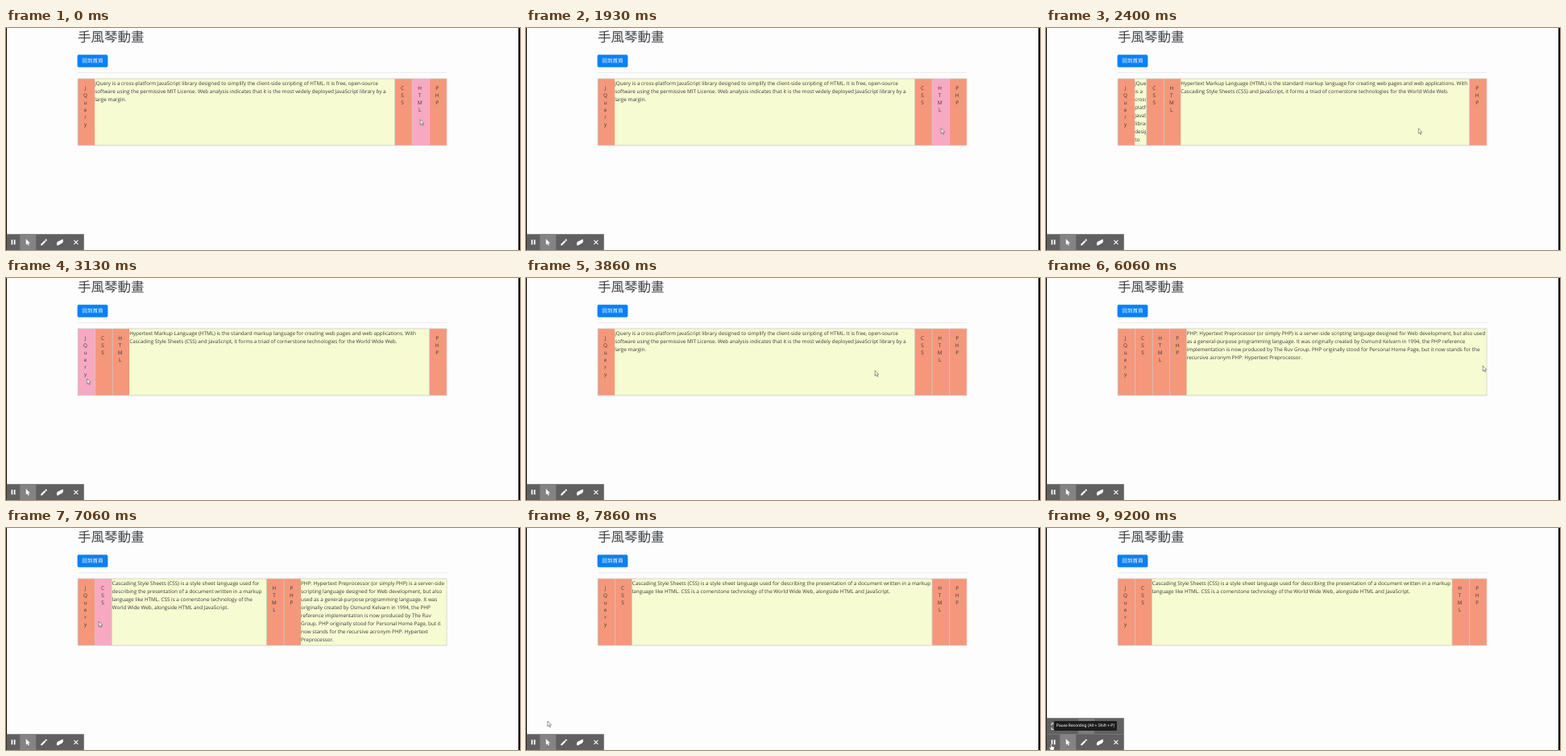
Write an HTML page that moves like this. It is 638 px wide and 276 px high and loops after 9.26 s.

```html
<!DOCTYPE html>
<html lang="zh-Hant">
<head>
<meta charset="utf-8">
<title>手風琴動畫</title>
<style>
  html, body { margin: 0; width: 100%; height: 100%; overflow: hidden; background: #fdfdfd; }
  body {
    position: relative; color: #36393c;
    font: 6.35px/10px "Open Sans", "Noto Sans", sans-serif;
    text-rendering: geometricPrecision;
  }
  body > * { position: absolute; }
  .edge { top: 0; height: 276px; background: #000; }
  h1 {
    left: 89px; top: 0; margin: 0; white-space: nowrap; color: #404346;
    font: 300 16.5px/20px "Noto Sans CJK TC", "Noto Sans CJK", sans-serif;
  }
  .home {
    left: 89px; top: 33px; width: 37px; color: #fff; text-align: center;
    font: 6.6px/15.5px "Noto Sans CJK TC", "Noto Sans CJK", sans-serif;
  }
  #acc { left: 89px; top: 63px; width: 458px; height: 83px; }
  .tab, .text { position: absolute; top: 1px; height: 81.6px; overflow: hidden; }
  .tab { width: 18px; padding-top: 5.8px; line-height: 9px; text-align: center; }
  .tab span { display: block; }
  svg { left: 0; top: 0; }
  #tip {
    left: 10px; top: 240px; width: 78px; height: 12px; border-radius: 1px;
    background: #1d1d1d; color: #fff; text-align: center; white-space: nowrap;
    font: 5px/12px Roboto, sans-serif;
  }
</style>
</head>
<body>
<div class="edge" style="left:0;width:1px"></div>
<div class="edge" style="right:0;width:2px"></div>

<svg width="638" height="276">
  <rect x="88.6" y="33.3" width="37.8" height="15.5" rx="1.7" fill="#0a7ff6"/>
  <rect x="89" y="55.2" width="458.5" height=".7" fill="#e5e5e5"/>
  <g id="panels"></g>
</svg>
<h1>手風琴動畫</h1>
<div class="home">回到首頁</div>
<div id="acc"></div>

<svg width="638" height="276">
  <g id="more">
    <path fill="#616161" d="M.5 236.3h96.3v20.2H.5z"/>
    <path fill="#7b7b7b" d="M40 236.3h20v20.2H40z"/>
    <path fill="none" stroke="#fff" d="M9.5 243H7v2.5M7 248v2.5h2.5"/>
  </g>
  <path fill="#606060" d="M.5 256.3h96.3v19.7H.5z"/>
  <path fill="#838383" d="M17.2 256.3h20v19.7h-20z"/>
  <g fill="#fff">
    <path d="M6.6 263.2h1.7v6H6.6zM9.8 263.2h1.7v6H9.8z"/>
    <path d="M24.8 262.3v7.2l1.7-1.5 1.1 2.6 1.2-.5-1.1-2.6h2.3z"/>
    <path d="M43.2 270.3v-1.6l4.7-4.7 1.6 1.6-4.7 4.7zM48.4 263.5l.9-.9q.3-.3.6 0l1 1q.3.3 0 .6l-.9.9z"/>
    <path d="M63 267l1.4-1.6 6.2-2.8.5 2.8-1.4 2-5.6 3-1.1-.6z"/>
  </g>
  <path stroke="#fff" stroke-width="1.1" d="M84.4 263.9l5 5M89.4 263.9l-5 5"/>
</svg>

<div id="tip">Pause Recording (Alt + Shift + P)</div>

<svg width="638" height="276">
  <g id="cursor" stroke="#444" stroke-width=".55" stroke-linejoin="round" fill="#fff">
    <path id="arrow" d="M.2.2v6.6l1.5-1.4 1.1 2.4 1-.4-1.1-2.4h2.1z"/>
    <path id="hand" d="M-.7.6Q0-.4.7.6v2.6l2.5.7q.8.3.7 1.2L3.3 8.5h-4L-2.7 5.2q-.2-1 .7-.8l1.3.9z"/>
  </g>
</svg>

<script>
const LOOP = 9260, STEP = 1000 / 15;
const LEFT = 89.6, TOP = 63.4, HEIGHT = 82.2;
const PITCH = 21.5, TAB = 20.6, FULL = 372, SLIDE = 400;
const SALMON = "#f5977a", PINK = "#f7a9c1", CREAM = "#f6fbd1", BORDER = "#cacaca";

const items = [
  ["JQuery", "jQuery is a cross-platform JavaScript library designed to simplify the client-side scripting of HTML. It is free, open-source software using the permissive MIT License. Web analysis indicates that it is the most widely deployed JavaScript library by a large margin."],
  ["CSS", "Cascading Style Sheets (CSS) is a style sheet language used for describing the presentation of a document written in a markup language like HTML. CSS is a cornerstone technology of the World Wide Web, alongside HTML and JavaScript."],
  ["HTML", "Hypertext Markup Language (HTML) is the standard markup language for creating web pages and web applications. With Cascading Style Sheets (CSS) and JavaScript, it forms a triad of cornerstone technologies for the World Wide Web."],
  ["PHP", "PHP: Hypertext Preprocessor (or simply PHP) is a server-side scripting language designed for Web development, but also used as a general-purpose programming language. It was originally created by Osmund Kelvarn in 1994, the PHP reference implementation is now produced by The Ruv Group. PHP originally stood for Personal Home Page, but it now stands for the recursive acronym PHP: Hypertext Preprocessor."]
];

// [time, item opened]
const clicks = [[-1000, 0], [2050, 2], [3250, 0], [4150, 1], [5400, 3], [6863, 1]];

// [time, x, y] of the pointer tip
const path = [
  [0, 514, 113.5], [480, 587, 112], [930, 540, 120], [1060, 538, 122], [1330, 538, 122],
  [1660, 515, 124], [1930, 515, 124.5], [2200, 515, 124.5], [3060, 100.5, 125],
  [3333, 100.5, 125], [4050, 493, 113], [4250, 494, 113], [4930, 556, 104.5],
  [5070, 556, 104.5], [5330, 537, 108], [5560, 537, 109], [6000, 542, 109],
  [6200, 542, 109], [6780, 115, 116], [7200, 115, 116], [8130, 6.5, 268], [LOOP, 6.5, 268]
];
const TOOLBAR_AT = 8130;

const $ = id => document.getElementById(id);
const swing = p => 0.5 - Math.cos(Math.PI * Math.min(1, Math.max(0, p))) / 2;

function addDiv(cls) {
  const el = document.createElement("div");
  el.className = cls;
  $("acc").append(el);
  return el;
}

function addRect(fill, x, y, width, height) {
  const el = document.createElementNS("http://www.w3.org/2000/svg", "rect");
  set(el, { fill, x, y, width, height });
  $("panels").append(el);
  return el;
}

function set(el, attrs) {
  for (const k in attrs) el.setAttribute(k, attrs[k]);
}

addRect(BORDER, LEFT - 0.8, TOP - 0.8, 4 * PITCH + FULL + 0.6, HEIGHT + 1.6);

const parts = items.map(([name, body]) => {
  const tab = addDiv("tab"), text = addDiv("text");
  for (const ch of name) {
    const span = document.createElement("span");
    span.textContent = ch;
    tab.append(span);
  }
  text.textContent = body;
  return {
    tab, text,
    tabBox: addRect(SALMON, 0, TOP, TAB, HEIGHT),
    textBox: addRect(CREAM, 0, TOP, 0, HEIGHT)
  };
});

function pointerAt(t) {
  const i = Math.max(1, path.findIndex(k => k[0] >= t));
  const [t0, x0, y0] = path[i - 1], [t1, x1, y1] = path[i];
  const p = swing((t - t0) / (t1 - t0));
  return [x0 + (x1 - x0) * p, y0 + (y1 - y0) * p];
}

function widthsAt(t) {
  const n = clicks.filter(c => c[0] <= t).length - 1;
  const [start, open] = clicks[n];
  const w = [0, 0, 0, 0];
  const p = n ? swing((t - start) / SLIDE) : 1;
  w[open] = FULL * p;
  if (n) w[clicks[n - 1][1]] = FULL * (1 - p);
  return w;
}

function draw(t) {
  const [px, py] = pointerAt(t), widths = widthsAt(t);
  let x = LEFT;
  parts.forEach(({ tab, text, tabBox, textBox }, i) => {
    const w = widths[i];
    const hover = px >= x && px <= x + TAB && py > TOP && py < TOP + HEIGHT;
    set(tabBox, { x, fill: hover ? PINK : SALMON });
    set(textBox, { x: x + TAB - 0.1, width: w && w + 0.1 });
    tab.style.left = x - 89 + "px";
    text.style.display = w > 0.1 ? "block" : "none";
    text.style.left = x - 89 + TAB + "px";
    text.style.width = w + "px";
    x += PITCH + w;
  });
  const onBar = t >= TOOLBAR_AT;
  for (const id of ["more", "hand", "tip"]) $(id).style.display = onBar ? "" : "none";
  $("arrow").style.display = onBar ? "none" : "";
  set($("cursor"), { transform: `translate(${px} ${py})` });
}

const begin = performance.now();
function tick() {
  const t = Math.max(0, performance.now() - begin) % LOOP;
  draw(Math.floor((t + 7) / STEP) * STEP);
  requestAnimationFrame(tick);
}
draw(0);
requestAnimationFrame(tick);
</script>
</body>
</html>
```
